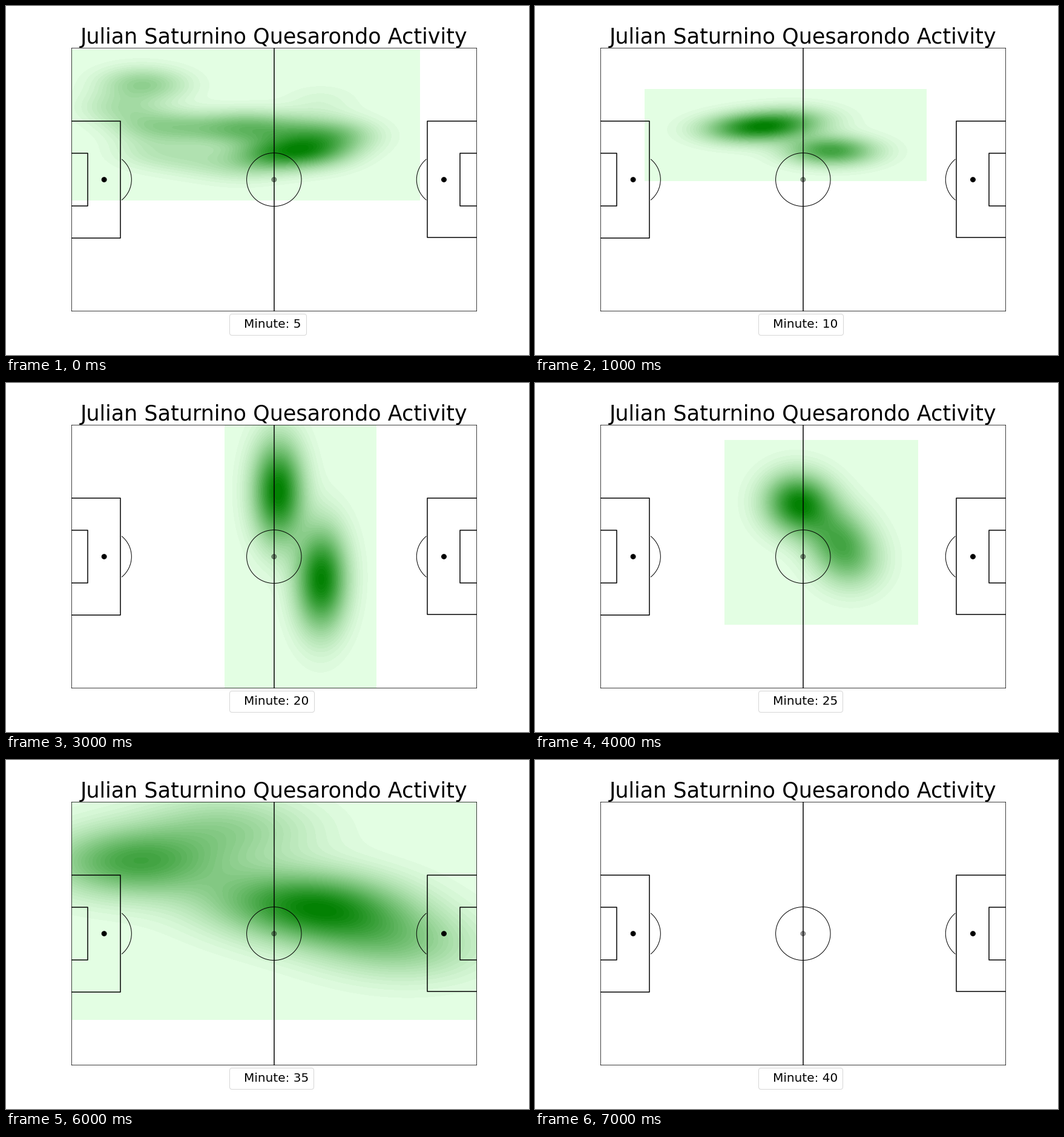
Recreate the animation shown at these times as a matplotlib script. Size 864x576 px, loop 8000 ms.

```python
import numpy as np
import matplotlib.pyplot as plt
from matplotlib.animation import FuncAnimation
from matplotlib.colors import LinearSegmentedColormap
from matplotlib.lines import Line2D
from matplotlib.patches import Arc, Circle

plt.rcParams["font.family"] = "DejaVu Sans"

LEFT, TOP, RIGHT, BOTTOM = 108, 69.12, 777.6, 504
LEVELS = 36
GREENS = LinearSegmentedColormap.from_list("greens", [(.9, 1, .9), (0, .5, 0)])


class Heat:
    """Density of touches spread along runs (start, end, weight), in stage pixels."""

    def __init__(self, hx, hy, *runs):
        self.hx, self.hy, self.runs = hx, hy, runs

    def grid(self):
        # The shaded box reaches three bandwidths past the outermost touches.
        ends = np.array([p for a, b, _ in self.runs for p in (a, b)])
        pad = 3 * np.array([self.hx, self.hy])
        x0, y0 = np.maximum(ends.min(axis=0) - pad, (LEFT, TOP))
        x1, y1 = np.minimum(ends.max(axis=0) + pad, (RIGHT, BOTTOM))
        return np.meshgrid(np.linspace(x0, x1, 140), np.linspace(y0, y1, 140))

    def density(self, x, y):
        z = np.zeros_like(x)
        for start, end, weight in self.runs:
            for px, py in np.linspace(start, end, 4):
                d = ((x - px) / self.hx) ** 2 + ((y - py) / self.hy) ** 2
                z += weight * np.exp(-d / 2)
        return z / z.max()

    def draw(self, ax):
        x, y = self.grid()
        return ax.contourf((x - LEFT) / (RIGHT - LEFT) * 120,
                           (BOTTOM - y) / (BOTTOM - TOP) * 80,
                           self.density(x, y), cmap=GREENS, zorder=.5,
                           levels=np.linspace(0, 1.0001, LEVELS + 1))


HEATS = [
    Heat(41, 18.5,
         ((195, 127), (260, 130), .35),
         ((165, 168), (215, 165), .2),
         ((225, 197), (370, 204), .65),
         ((230, 240), (390, 265), .4),
         ((425, 246), (525, 237), 1.08),
         ((400, 200), (561, 213), .9),
         ((510, 158), (530, 158), .06)),
    Heat(48, 16,
         ((325, 205), (395, 197), 2),
         ((395, 197), (445, 185), .9),
         ((475, 237), (503, 241), 1.6)),
    Heat(26, 30,
         ((452, 219), (470, 240), 1),
         ((505, 290), (520, 315), .7)),
    Heat(28, 57,
         ((445, 176), (454, 182), 1),
         ((514, 333), (528, 315), 1)),
    Heat(36, 33,
         ((421, 193), (450, 205), 1),
         ((490, 240), (525, 300), .9)),
    Heat(80, 5.7,
         ((215, 199), (290, 201), .95),
         ((400, 206), (465, 208), .8),
         ((530, 160), (565, 159), .42)),
    Heat(85, 38,
         ((165, 170), (260, 165), .74),
         ((320, 105), (420, 120), .35),
         ((370, 215), (390, 225), .15),
         ((455, 235), (570, 252), 1),
         ((590, 285), (690, 315), .45)),
    None,
]


def line(xs, ys):
    ax.plot(xs, ys, color="black", lw=1.5)


def draw_pitch():
    line([0, 120, 120, 0, 0], [0, 0, 80, 80, 0])
    line([60, 60], [0, 80])
    for edge, depth, low, high in [(0, 14.6, 22.2, 57.8), (120, 105.4, 22.5, 57.8),
                                   (0, 4.9, 32, 48), (120, 115.1, 32, 48)]:
        line([edge, depth, depth, edge], [high, high, low, low])
    ax.add_patch(Circle((60, 40), 8.1, color="black", fill=False))
    ax.add_patch(Circle((60, 40), .71, color="black", alpha=.4))
    for x, facing in [(9.7, 0), (110.3, 180)]:
        ax.add_patch(Circle((x, 40), .71, color="black"))
        ax.add_patch(Arc((x, 40), 16.2, 16.2, theta1=facing - 50,
                         theta2=facing + 50, color="black"))


fig = plt.figure(figsize=(12, 8), dpi=72, facecolor="white")
ax = fig.add_axes([.125, .125, .775, .755])
ax.axis("off")
draw_pitch()
ax.set_xlim(0, 120)
ax.set_ylim(0, 80)
ax.set_title("Julian Saturnino Quesarondo Activity", fontsize=35)
legend = ax.legend([Line2D([], [], lw=0)], ["Minute: 5"], loc=(.39, -.09),
                   fontsize=20, handlelength=0)
shown = []


def update(i):
    while shown:
        shown.pop().remove()
    if HEATS[i]:
        shown.append(HEATS[i].draw(ax))
    legend.get_texts()[0].set_text(f"Minute: {5 * (i + 1)}")
    return []


anim = FuncAnimation(fig, update, frames=len(HEATS), interval=1000,
                     init_func=lambda: [], repeat=True)
plt.show()
```
